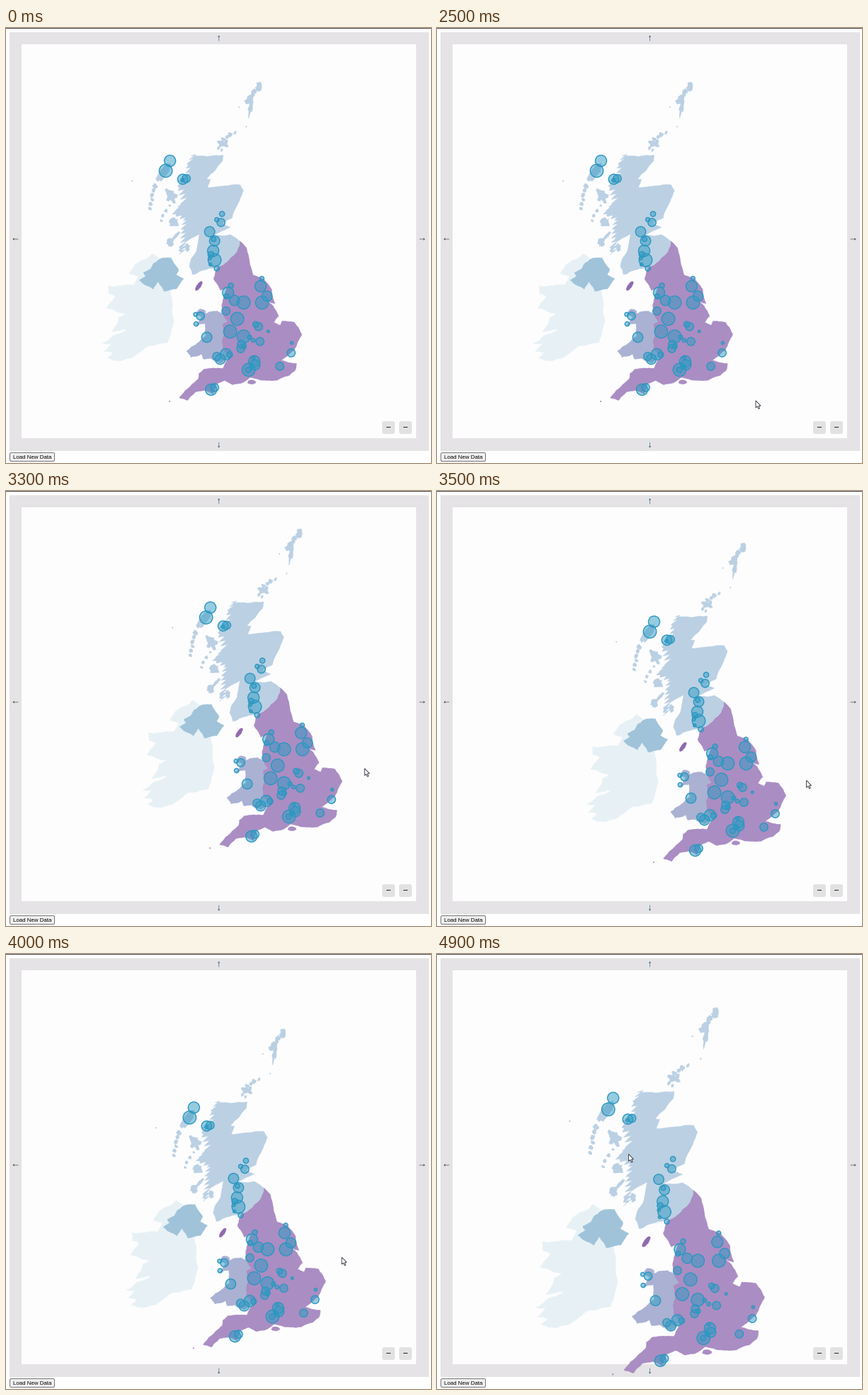
A matplotlib script for the animation above (5 s loop, 600 by 614 pixels).

```python
import numpy as np
import matplotlib.pyplot as plt
from matplotlib.animation import FuncAnimation
from matplotlib.patches import FancyBboxPatch, PathPatch, Polygon, Rectangle
from matplotlib.textpath import TextPath
from matplotlib.transforms import Affine2D

W, H, DPI = 600, 614, 100
PX = 72 / DPI  # points per pixel
FRAMES, STEP = 50, 100

PURPLE, MAN = "#aa8dc3", "#9069ae"
SCOT, WELSH = "#bbd0e3", "#aab1d3"
NORTH, EIRE = "#a0c3da", "#e7f1f5"
PANEL, PAPER = "#e5e3e5", "#fdfdfe"
NAVY, INK = "#1c4677", "#222222"
FONT = "Liberation Sans"

rng = np.random.default_rng(4)

# Key points of each outline as (lon, lat); roughness fills in the rest.
ENG_EAST = [
    (-2.03, 55.81), (-1.6, 55.55), (-1.41, 55), (-1.2, 54.62), (-.6, 54.49),
    (-.08, 54.12), (.12, 53.6), (-.4, 53.72), (0, 53.53), (.34, 53.15),
    (.05, 52.92), (.45, 52.82), (.55, 52.97), (1.3, 52.93), (1.76, 52.48),
    (1.3, 51.9), (.95, 51.72), (.5, 51.5), (1.44, 51.38), (1.36, 51.13)]
ENG_SOUTH = [
    (.97, 50.92), (.25, 50.74), (-.78, 50.75), (-1.4, 50.85), (-1.95, 50.62),
    (-2.45, 50.57), (-2.95, 50.73), (-3.45, 50.6), (-3.65, 50.21),
    (-4.15, 50.35), (-4.7, 50.3), (-5.2, 49.96), (-5.71, 50.06),
    (-4.95, 50.58), (-4.55, 50.8), (-4.52, 51), (-4.2, 51.17), (-3.05, 51.2),
    (-2.67, 51.63)]
MARCHES = [(-2.67, 51.63), (-3.1, 51.95), (-3, 52.5), (-3.1, 52.85),
           (-2.8, 52.95), (-3.08, 53.25)]
ENG_WEST = [(-3.1, 53.4), (-3.05, 53.75), (-2.82, 54.15), (-3.2, 54.08),
            (-3.62, 54.5), (-3.4, 54.88), (-3.03, 54.99)]
CHEVIOT = [(-3.03, 54.99), (-2.2, 55.45), (-2.03, 55.81)]
WALES = [
    (-3.08, 53.25), (-3.4, 53.34), (-4.2, 53.22), (-4.7, 52.8),
    (-4.13, 52.88), (-4.08, 52.42), (-4.7, 52.1), (-5.28, 51.85), (-5, 51.62),
    (-4.35, 51.74), (-4.25, 51.56), (-3.8, 51.58), (-3.2, 51.4),
    (-2.67, 51.63)]
SCOT_EAST = [
    (-2.03, 55.81), (-2.6, 56.03), (-3.6, 56), (-2.6, 56.27), (-3.1, 56.4),
    (-2.48, 56.6), (-2.05, 57.15), (-1.8, 57.5), (-2, 57.69), (-4, 57.6),
    (-3.8, 57.86), (-4.05, 57.88), (-3.08, 58.45), (-3.03, 58.64),
    (-5, 58.62)]
SCOT_WEST = [
    (-5, 58.62), (-5.3, 58.23), (-5.3, 57.97), (-5.8, 57.8), (-5.75, 57.4),
    (-5.6, 57.1), (-6.15, 56.72), (-5.45, 56.52), (-5.6, 56.1),
    (-5.75, 55.31), (-5.4, 55.75), (-4.75, 55.95)]
GALLOWAY = [(-4.65, 55.5), (-5.1, 54.95), (-4.9, 54.64), (-4.5, 54.75),
            (-3.6, 54.88), (-3.03, 54.99)]
IRELAND = [
    (-7.2, 55.05), (-6.95, 55.23), (-7.37, 55.38), (-7.7, 55.2), (-8.4, 55),
    (-8.75, 54.68), (-8.2, 54.58), (-8.5, 54.27), (-9.2, 54.25),
    (-10.05, 54.25), (-10, 53.95), (-9.6, 53.88), (-10.15, 53.45),
    (-9, 53.23), (-9.4, 53.1), (-9.85, 52.57), (-8.9, 52.67), (-9.7, 52.45),
    (-10.4, 52.15), (-9.85, 52.13), (-10.3, 51.85), (-9.75, 51.8),
    (-10.1, 51.6), (-9.7, 51.5), (-8.6, 51.6), (-7.6, 52.05), (-6.4, 52.18),
    (-6.03, 52.95), (-6.12, 53.55), (-6.27, 54.1), (-7, 54.5)]
ULSTER = [
    (-7.3, 55.02), (-6.97, 55.17), (-6.2, 55.23), (-5.75, 54.82),
    (-5.9, 54.65), (-5.45, 54.5), (-5.9, 54.13), (-6.27, 54.1),
    (-6.65, 54.05), (-7, 54.4), (-7.3, 54.13), (-8.15, 54.45), (-7.75, 54.6),
    (-7.9, 54.7), (-7.45, 54.85)]

# Centres of the larger dots by radius; the small ones are scattered by seed.
DOTS = {
    9.2: [(225, 201), (294, 327), (361, 387), (335, 387), (326, 410),
          (316, 428), (335, 435), (342, 482)],
    8: [(231, 187), (292, 314), (359, 364), (313, 373), (310, 460),
        (350, 470), (289, 510)],
    7.2: [(249, 213), (287, 287), (294, 300), (368, 378), (322, 384),
          (302, 467), (351, 475), (283, 436)],
    5.7: [(254, 212), (303, 274), (310, 399), (356, 421), (358, 442),
          (274, 406), (331, 452), (386, 477), (402, 458), (294, 507),
          (297, 463), (332, 446)],
}
SMALL_DOTS = 24

# Key poses: time in seconds, x, y.
PAN = [(2.8, 0, 0), (3.1, 24, -12), (3.3, 57, -23), (3.5, 75, -3),
       (3.8, 55, 27), (4.2, 20, 26)]
MOUSE = [(2.4, 448, 602), (2.5, 450, 526), (2.8, 456, 392), (3.1, 480, 380),
         (3.5, 521.5, 408.5), (3.8, 488, 424.5), (4.0, 474, 428),
         (4.4, 534, 547), (4.6, 478, 470), (4.8, 270.5, 282.5)]
ZOOM_AT, ZOOM = 4.9, 2 ** 0.2


def project(points):
    """Mercator projection from lon, lat to stage pixels."""
    lon, lat = np.transpose(points)
    north = np.arcsinh(np.tan(np.radians(lat)))
    return np.column_stack([376.9 + 23.16 * lon,
                            521.5 - 1327 * (north - 1.0127)])


def coast(points, amount=.08, levels=3):
    """Add bays by shifting the middle of each segment sideways."""
    pts = project(points)
    for _ in range(levels):
        a, b = pts[:-1], pts[1:]
        side = (b - a)[:, ::-1] * [1, -1]
        mid = (a + b) / 2 + side * rng.uniform(-amount, amount, (len(a), 1))
        out = np.empty((len(pts) + len(mid), 2))
        out[::2], out[1::2] = pts, mid
        pts = out
    return pts


def fjords(points, gap=3.2):
    """Cut narrow inlets to the north-east into every second coast point."""
    pts = coast(points)
    run = np.hypot(*np.diff(pts, axis=0).T).cumsum()
    run = np.insert(run, 0, 0)
    s = np.arange(0, run[-1], gap)
    pts = np.column_stack([np.interp(s, run, pts[:, k]) for k in (0, 1)])
    depth = rng.uniform(2, 11, (len(pts[1::2]), 1))
    pts[1::2] += depth * [.85, -.5]
    return pts


def glide(keys, t):
    """Smooth cubic path through timed key points, at rest at both ends."""
    keys = np.array(keys, float)
    time, pos = keys[:, 0], keys[:, 1:]
    slope = np.gradient(pos, time, axis=0)
    slope[[0, -1]] = 0
    t = np.clip(t, time[0], time[-1])
    j = min(np.searchsorted(time, t, side="right") - 1, len(time) - 2)
    h = time[j + 1] - time[j]
    s = (t - time[j]) / h
    ease = s * s * (3 - 2 * s)
    return (pos[j] + (pos[j + 1] - pos[j]) * ease
            + h * s * (1 - s) * (slope[j] * (1 - s) - slope[j + 1] * s))


fig = plt.figure(figsize=(W / DPI, H / DPI), dpi=DPI, facecolor="white")
ax = fig.add_axes([0, 0, 1, 1])
ax.set(xlim=(0, W), ylim=(H, 0))
ax.axis("off")
view = Affine2D()


def box(x0, y0, x1, y1, color):
    ax.add_patch(Rectangle((x0, y0), x1 - x0, y1 - y0, fc=color, lw=0, zorder=0))


def round_box(x0, y0, x1, y1, r, fill, edge="none"):
    ax.add_patch(FancyBboxPatch(
        (x0, y0), x1 - x0, y1 - y0, boxstyle=f"round,pad=0,rounding_size={r}",
        fc=fill, ec=edge, lw=PX, zorder=6))


def glyph(char, x, y, color, size=13):
    """Draw one character with its ink centred on x, y."""
    path = TextPath((0, 0), char, size=size, prop={"family": FONT})
    ink = path.get_extents()
    place = Affine2D().translate(-(ink.x0 + ink.x1) / 2, -(ink.y0 + ink.y1) / 2)
    place.scale(1, -1).translate(x, y)
    ax.add_patch(PathPatch(path.transformed(place), fc=color, lw=0, zorder=7))


def land(pts, color):
    ax.add_patch(Polygon(pts, fc=color, ec=color, lw=.3, zorder=2,
                         transform=view + ax.transData))


def isle(lon, lat, w, h, tilt=0, color=SCOT, ragged=.25):
    """Ragged ellipse; a positive tilt leans its top to the right."""
    a = np.linspace(0, 2 * np.pi, 18, endpoint=False)
    r = 1 + rng.uniform(-ragged, ragged, a.size)
    ring = np.column_stack([w * r * np.cos(a), h * r * np.sin(a)])
    ring = Affine2D().rotate_deg(tilt).transform(ring)
    land(project([(lon, lat)]) + ring, color)


def isle_chain(start, end, count, size, spread):
    """Small isles strewn along a line."""
    for f in np.linspace(0, 1, count):
        lon, lat = (1 - f) * np.array(start) + f * np.array(end)
        w, h = size * rng.uniform(.5, 1.1, 2)
        isle(lon + rng.uniform(-spread, spread), lat, w, h, 30)


def draw_page():
    box(0, 0, W, 1, "#4a4a50")
    box(5, 6, 597, 597, PANEL)
    box(22, 23, 579, 579, PAPER)
    glyph("↑", 300.5, 14.5, NAVY)
    glyph("↓", 300.5, 588.5, NAVY)
    glyph("←", 13.5, 298, INK)
    glyph("→", 587.5, 298, INK)
    for x, sign in ((540, "+"), (564, "−")):
        round_box(x - 9, 555, x + 9, 573, 3, "#e3e2e3")
        glyph(sign, x, 563.8, INK)
    round_box(5.5, 599.5, 68.5, 611.5, 2, "#efefef", "#767676")
    ax.text(36.8, 608.2, "Load New Data", fontsize=7.9 * PX, ha="center",
            va="baseline", family=FONT, color="black", zorder=7)


def draw_isles():
    isle(-6.65, 58.1, 5.5, 17, 38)
    isle(-6.25, 57.36, 7, 10, -25, ragged=.4)
    isle(-6.02, 56.45, 6, 6, ragged=.4)
    isle(-5.9, 56.0, 2, 7, 40)
    isle(-6.27, 55.77, 4.5, 6)
    isle(-5.22, 55.58, 3, 5.5)
    isle_chain((-7.2, 57.65), (-7.5, 56.9), 6, 3.6, .06)
    isle_chain((-6.9, 56.5), (-6.2, 57.0), 4, 2.2, .1)
    isle(-3.07, 59.0, 6.5, 3.8, 15, ragged=.35)
    isle_chain((-3.25, 58.8), (-2.5, 59.35), 9, 3, .25)
    isle(-1.33, 60.2, 3, 16, 8, ragged=.45)
    isle_chain((-1.55, 60.3), (-.85, 60.8), 6, 4, .12)
    for lon, lat in ((-8.58, 57.81), (-1.63, 59.53), (-2.07, 60.13)):
        isle(lon, lat, .8, .8)
    isle(-4.37, 53.28, 6, 5, color=WELSH, ragged=.1)
    isle(-1.3, 50.67, 5.5, 3, color=PURPLE, ragged=.1)
    isle(-6.3, 49.92, .8, .8, color=PURPLE)
    isle(-4.52, 54.24, 2.8, 8, 35, color=MAN, ragged=.08)


def draw_map():
    land(coast(IRELAND), EIRE)
    land(coast(ULSTER), NORTH)
    marches, cheviot = coast(MARCHES), coast(CHEVIOT)
    land(np.vstack([coast(ENG_EAST + ENG_SOUTH, .05), marches,
                    coast(ENG_WEST), cheviot]), PURPLE)
    land(np.vstack([coast(WALES), marches]), WELSH)
    land(np.vstack([coast(SCOT_EAST, .05), fjords(SCOT_WEST),
                    coast(GALLOWAY), cheviot]), SCOT)
    draw_isles()


def draw_dots():
    big = np.vstack(list(DOTS.values())) + .5
    radii = np.repeat(list(DOTS), [len(p) for p in DOTS.values()])
    near = big[rng.integers(len(big), size=SMALL_DOTS)]
    small = near + rng.normal(0, 9, near.shape)
    radii = np.append(radii, rng.uniform(1.5, 4.2, SMALL_DOTS))
    ax.scatter(*np.vstack([big, small]).T, s=(2 * radii * PX) ** 2,
               fc=(.19, .61, .77, .5), ec="#2c97c0", lw=1.4 * PX, zorder=3,
               transform=view + ax.transData)


draw_page()
draw_map()
draw_dots()

POINTER = np.array([(0, 0), (0, 10), (2.3, 8), (4, 11.6), (5.6, 10.9),
                    (4, 7.4), (7, 7.2)])
mouse = ax.add_patch(Polygon(POINTER, fc="white", ec="#33333c", lw=.9 * PX,
                             zorder=9, visible=False))


def update(i):
    t = i * STEP / 1000 + 1e-6
    tip = glide(MOUSE, t)
    view.clear().translate(*glide(PAN, t))
    if t >= ZOOM_AT:
        view.translate(*-tip).scale(ZOOM).translate(*tip)
    mouse.set_visible(t >= MOUSE[0][0])
    mouse.set_xy(POINTER + tip)
    return [mouse]


anim = FuncAnimation(fig, update, frames=FRAMES, interval=STEP, repeat=True,
                     repeat_delay=0, blit=False)
plt.show()
```
